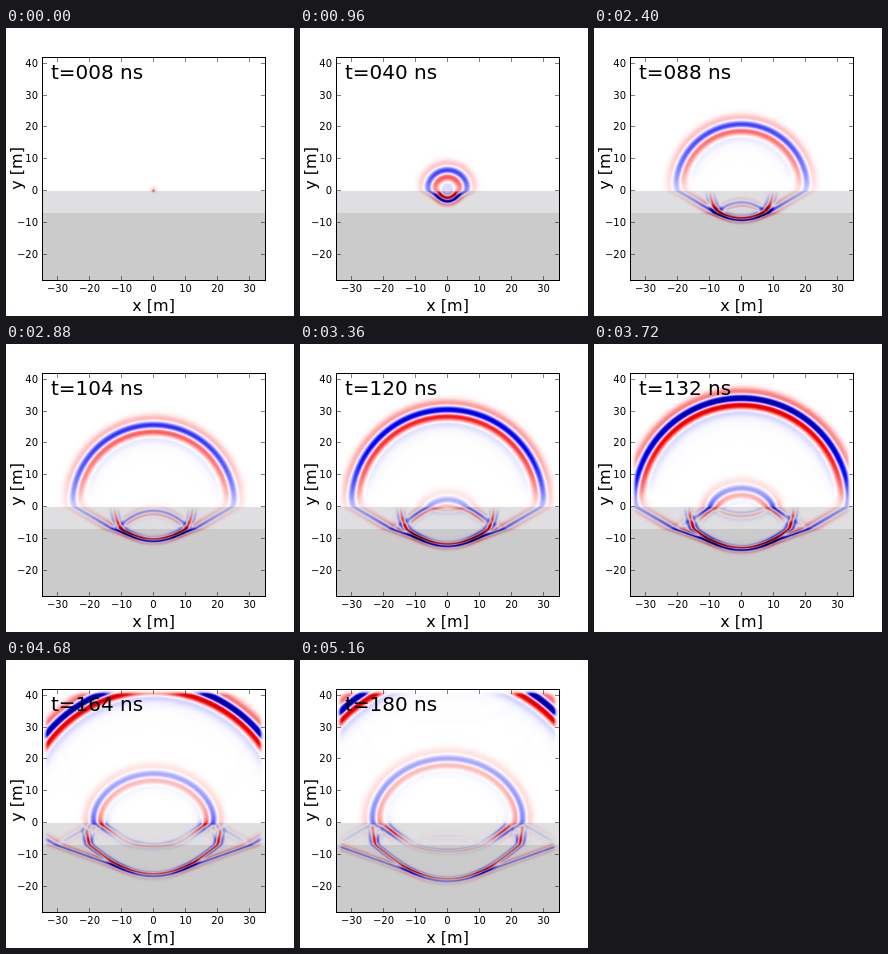
These frames come from a looping animation (288 by 288 pixels, 5.28 s). An HTML page with a canvas:

```html
<!DOCTYPE html>
<html>
<head>
<meta charset="utf-8">
<style>
  html, body { margin: 0; width: 100%; height: 100%; overflow: hidden; background: #fff; }
  canvas { display: block; }
</style>
</head>
<body>
<canvas id="stage" width="288" height="288"></canvas>
<script>
// Radar pulse over two ground layers: a finite-difference wave solver on the
// right half of the domain, mirrored about x = 0. Units: metres, nanoseconds.
const FRAMES = 44, FRAME_MS = 120;
const DX = 0.125, DT = 0.25, SPEED = 0.29979;
const NX = 281, NY = 561, SURFACE = 336, LAYER = 392;
const LEFT = 36, TOP = 28.8, SCALE = 223.2 / 70;

const field = () => new Float32Array(NX * NY);
const H = field(), Hx = field(), Hy = field(), Ex = field(), Ey = field();
const COURANT = SPEED * DT / DX;

const permittivity = row =>
  row < SURFACE ? 1 : row === SURFACE ? 2.5 : row < LAYER ? 4 : row === LAYER ? 6.5 : 9;
const groundLoss = row => row >= LAYER ? Math.exp(-0.04 * DT) : 1;
const absorb = depth => Math.exp(-1.2 * Math.max(0, depth) * DT);
const absorbX = col => absorb(col * DX - 33);
const absorbY = row => absorb(Math.max(2 - row * DX, row * DX - 68));

const dampX = Float32Array.from({ length: NX }, (_, i) => absorbX(i));
const dampXHalf = Float32Array.from({ length: NX }, (_, i) => absorbX(i + 0.5));

// Negative Ricker wavelet, 50 MHz
function wavelet(t) {
  const u = (Math.PI * 0.05 * (t - 20)) ** 2;
  return -(1 - 2 * u) * Math.exp(-u);
}

let steps = 0;
function step() {
  for (let j = 0; j < NY - 1; j++) {
    const cv = COURANT / permittivity(j + 0.5), ch = COURANT / permittivity(j);
    const lv = groundLoss(j + 0.5) * absorbY(j + 0.5), lh = groundLoss(j);
    for (let i = 0, k = j * NX; i < NX - 1; i++, k++) {
      Ex[k] = lv * Ex[k] + cv * (H[k + NX] - H[k]);
      Ey[k] = lh * dampXHalf[i] * Ey[k] + ch * (H[k + 1] - H[k]);
    }
  }
  for (let j = 1; j < NY - 1; j++) {
    const dy = absorbY(j);
    for (let i = 0, k = j * NX; i < NX - 1; i++, k++) {
      const before = i ? Ey[k - 1] : -Ey[k];
      Hx[k] = dampX[i] * Hx[k] + COURANT * (Ey[k] - before);
      Hy[k] = dy * Hy[k] + COURANT * (Ex[k] - Ex[k - NX]);
      H[k] = Hx[k] + Hy[k];
    }
  }
  const source = SURFACE * NX;
  const kick = wavelet((steps + 0.5) * DT) * DT / (DX * DX);
  Hx[source] += kick / 2;
  Hy[source] += kick / 2;
  H[source] += kick;
  steps++;
}

// Colour range over time, interpolated geometrically
const RANGE = [[8, 0.9], [24, 1.5], [40, 0.93], [72, 0.63], [104, 0.42], [132, 0.19], [148, 0.17], [180, 0.14]];
function colourRange(t) {
  const n = Math.max(1, RANGE.findIndex(p => p[0] >= t));
  const [t0, a] = RANGE[n - 1], [t1, b] = RANGE[n];
  return a * (b / a) ** ((t - t0) / (t1 - t0));
}

function makeCanvas(size) {
  const c = document.createElement('canvas');
  c.width = c.height = size;
  return c;
}
const full = makeCanvas(NY), fullCtx = full.getContext('2d');
const pixels = fullCtx.createImageData(NY, NY);
pixels.data.fill(255);

function paintField(range) {
  const d = pixels.data;
  for (let j = 0; j < NY; j++) {
    for (let i = 0; i < NX; i++) {
      const v = Math.max(-1, Math.min(1, H[j * NX + i] / range));
      const a = Math.abs(v);
      const fade = Math.max(0, 255 * (1 - 2 * a));
      const dark = Math.max(0, 2 * a - 1);
      const main = 255 * (1 - dark * (v < 0 ? 0.7 : 0.5));
      for (const col of [NX - 1 + i, NX - 1 - i]) {
        const p = 4 * (j * NY + col);
        d[p] = v < 0 ? fade : main;
        d[p + 1] = fade;
        d[p + 2] = v < 0 ? main : fade;
      }
    }
  }
  fullCtx.putImageData(pixels, 0, 0);
}

const cache = [];
function fieldImage(index) {
  while (cache.length <= index) {
    const t = 8 + 4 * cache.length;
    while (steps * DT < t) step();
    paintField(colourRange(t));
    const small = makeCanvas(223), c = small.getContext('2d');
    c.imageSmoothingQuality = 'high';
    c.drawImage(full, 0, 0, 223, 223);
    cache.push(small);
  }
  return cache[index];
}

const ctx = document.getElementById('stage').getContext('2d');

function text(str, x, y, size, align) {
  ctx.font = size + 'px "DejaVu Sans", sans-serif';
  ctx.textAlign = align;
  ctx.fillText(str, x, y);
}

function drawAxes() {
  ctx.fillStyle = ctx.strokeStyle = '#000';
  ctx.lineWidth = 1;
  ctx.strokeRect(36.5, 29.5, 223, 223);
  ctx.lineWidth = 0.5;
  ctx.beginPath();
  const line = (x, y, dx, dy) => { ctx.moveTo(x, y); ctx.lineTo(x + dx, y + dy); };
  const label = v => String(v).replace('-', '\u2212');
  for (let v = -30; v <= 40; v += 10) {
    const x = Math.floor(LEFT + (v + 35) * SCALE) + 0.5;
    const y = Math.floor(TOP + (42 - v) * SCALE) + 0.5;
    if (v < 40) {
      line(x, 252, 0, -4);
      line(x, 30, 0, 4);
      text(label(v), x, 264, 10, 'center');
    }
    if (v > -30) {
      line(37, y, 4, 0);
      line(259, y, -4, 0);
      text(label(v), 32, y + 3.5, 10, 'right');
    }
  }
  ctx.stroke();
  text('x [m]', 147.6, 283, 16, 'center');
  ctx.save();
  ctx.translate(16, 140.4);
  ctx.rotate(-Math.PI / 2);
  text('y [m]', 0, 0, 16, 'center');
  ctx.restore();
}

function draw(index) {
  ctx.fillStyle = '#fff';
  ctx.fillRect(0, 0, 288, 288);
  ctx.drawImage(fieldImage(index), 36, 29);
  ctx.fillStyle = 'rgba(0,0,20,0.125)';
  ctx.fillRect(36, 163, 223, 22);
  ctx.fillStyle = 'rgba(0,0,0,0.205)';
  ctx.fillRect(36, 185, 223, 67);
  drawAxes();
  text('t=' + String(8 + 4 * index).padStart(3, '0') + ' ns', 44.9, 51, 20, 'left');
}

const start = performance.now();
let shown = -1;
function tick() {
  const index = Math.floor((performance.now() - start) / FRAME_MS) % FRAMES;
  if (index !== shown) draw(shown = index);
  requestAnimationFrame(tick);
}
tick();
</script>
</body>
</html>
```
